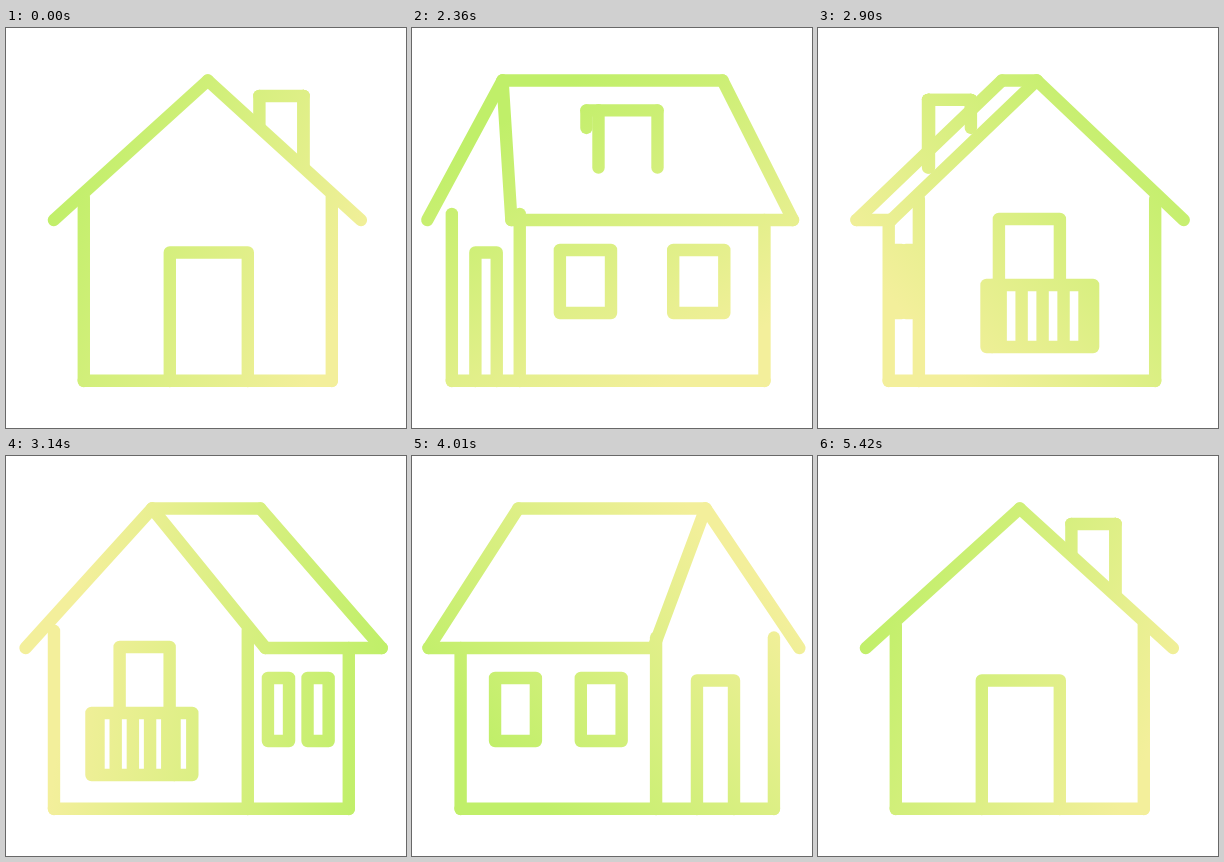
Recreate the animation shown at these times as an HTML page without scripts. Size 400 px wide and 400 px high, loop 5450 ms.

```html
<!DOCTYPE html>
<html lang="en">
<head>
<meta charset="utf-8">
<title>Turning house</title>
<style>
@property --a { syntax: "<number>"; inherits: true; initial-value: 0; }
@property --g { syntax: "<number>"; inherits: true; initial-value: 25; }

html, body { margin: 0; width: 100%; height: 100%; overflow: hidden; background: #fff; }
body { animation: turn 5450ms infinite; }

/* --a: turn of the house, --g: direction of the tint, in degrees */
@keyframes turn {
  0% { --a: 0; --g: 25; animation-timing-function: steps(1); }
  37.24% { --a: 1.5; --g: 25; animation-timing-function: steps(21); }
  48.8% { --a: 120; --g: 90; animation-timing-function: steps(8); }
  53.2% { --a: 166; --g: 138; animation-timing-function: steps(8); }
  57.61% { --a: 211; --g: 188; animation-timing-function: steps(7); }
  61.46% { --a: 241.5; --g: 222; animation-timing-function: steps(6); }
  64.77% { --a: 264; --g: 250; animation-timing-function: steps(11); }
  70.82% { --a: 298; --g: 300; animation-timing-function: steps(11); }
  76.88% { --a: 322; --g: 340; animation-timing-function: steps(12); }
  83.48% { --a: 340; --g: 370; animation-timing-function: steps(14); }
  91.19% { --a: 353; --g: 380; animation-timing-function: steps(15); }
  99.44%, 100% { --a: 360; --g: 385; }
}

svg {
  display: block; width: 400px; height: 400px; isolation: isolate;
  --p: cos(var(--a) * 1deg);
  --q: sin(var(--a) * 1deg);
  /* flattened cosine and sine: share of the gable and of the long side */
  --C: calc(var(--p) * pow(max(var(--p), -1 * var(--p)), .6));
  --S: calc(var(--q) * pow(max(var(--q), -1 * var(--q)), .6));
  --m: max(var(--C), -1 * var(--C));
  --n: max(var(--S), -1 * var(--S));
  --k: sin(var(--a) * 2deg);
  --c: calc(201.8 - 2 * var(--k) * var(--k));  /* centre of the ridge */
  --E: calc(var(--c) - .4 - 2.5 * var(--k));   /* centre of the eaves */
  --W: calc(var(--c) - 5.5 * var(--k));        /* centre of the walls */
  --T: calc(168 * var(--S));                   /* half eave */
  --R: calc(var(--S) * (174 - 51 * var(--n))); /* half ridge */
  --V: calc(var(--S) * var(--n));              /* chimney depth */
  --P: clamp(-18, 54 * var(--S), 18);          /* balcony depth */
  --B: calc(var(--W) + 146 * var(--S));        /* centre of the back wall */
  --top: calc(68 + 16 * max(var(--q), -1 * var(--q)));
}
.house { fill: none; stroke: #000; stroke-width: 12.4; stroke-linecap: round; stroke-linejoin: round; }
path { vector-effect: non-scaling-stroke; }

/* --s: right 1, left -1; --z: front 1, back -1 */
.r { --s: 1; } .l { --s: -1; }
.f { --z: 1; } .b { --z: -1; }

.edge, .post { opacity: calc(999 * (max(var(--z) * var(--C), var(--s) * var(--S)) - .004)); }
.edge {
  --x: calc(var(--c) - var(--z) * var(--R));
  --y: calc(var(--E) + var(--s) * 153.5 * var(--C) - var(--z) * var(--T));
  transform: matrix(1, 0, calc((var(--y) - var(--x)) / 139.5), 1, var(--x), 52.5);
}
.post {
  transform: matrix(1, 0, 0, calc(1 + max(0, var(--z) * var(--C)) * 22 / 161),
    calc(var(--W) + var(--s) * 124 * var(--C) - var(--z) * 146 * var(--S)), 353);
}
.ridge { transform: matrix(calc(var(--R) + .01), 0, 0, 1, var(--c), 52.5); opacity: calc(999 * (var(--n) - .004)); }
.floor { transform: matrix(calc(124 * var(--m) + 146 * var(--n)), 0, 0, 1, var(--W), 352.8); }
.eave {
  transform: matrix(calc(var(--T) + .01), 0, 0, 1, calc(var(--E) + var(--s) * 153.5 * var(--C)), 192);
}
.side { transform: matrix(var(--S), 0, 0, 1, calc(var(--W) + var(--s) * 124 * var(--C)), 0); }
.eave, .side { opacity: calc(999 * (var(--s) * var(--S) - .004)); }
.pane { transform: matrix(1, 0, 0, 1, calc(var(--s) * (50 + 21 * var(--n))), 0); }
.gable {
  transform: matrix(var(--C), 0, 0, 1, calc(var(--W) - var(--z) * 146 * var(--S)), 0);
  opacity: calc(999 * (var(--z) * var(--C) - .004));
}

.rail { transform: matrix(var(--C), 0, 0, 1, calc(var(--B) + var(--P)), 0); opacity: calc(999 * (.1 - var(--C))); }
.flank {
  transform: matrix(var(--P), 0, 0, 1, calc(var(--B) + var(--s) * 53 * var(--C)), 0);
  opacity: calc(999 * min(.1 - var(--C), var(--s) * var(--S) - .004));
}

.leg {
  --y: calc(53 + .9026 * var(--x));
  transform: matrix(1, 0, 0, calc(var(--y) - var(--top)),
    calc(var(--E) + var(--x) * var(--C) - var(--V) * (12 + 42 * var(--z))), var(--top));
}
.out { --x: 96; } .in { --x: 52; }
.lid { transform: matrix(calc(42 * var(--V) + .01), 0, 0, 1, calc(var(--E) + 96 * var(--C) - 12 * var(--V)), var(--top)); }
.rim { transform: matrix(var(--C), 0, 0, 1, calc(var(--E) - var(--V) * (12 + 42 * var(--z))), var(--top)); }
.in, .rim { opacity: calc(999 * (var(--z) * var(--C) - .004)); }
.far { opacity: calc(999 * max(var(--C), var(--S) + .15)); }
.near { opacity: calc(999 * (var(--S) - .004)); }

/* white roof that hides the chimney behind it */
.cover {
  fill: #fff; stroke: none;
  --x: max(var(--R), -1 * var(--R));
  --y: calc(153.5 * var(--m) + 168 * var(--n));
  clip-path: polygon(
    calc(1px * (var(--c) - var(--x))) 53px, calc(1px * (var(--c) + var(--x))) 53px,
    calc(1px * (var(--E) + var(--y))) 192px, calc(1px * (var(--E) - var(--y))) 192px);
}
.tint {
  fill: url(#lime); mix-blend-mode: screen;
  transform: translate(calc(1px * (212 - 10 * var(--C))), 204px) rotate(calc(var(--g) * 1deg));
}
</style>
</head>
<body>
<svg viewBox="0 0 400 400">
  <defs>
    <linearGradient id="lime" gradientUnits="userSpaceOnUse" x1="-155" y1="0" x2="155" y2="0">
      <stop offset="0" stop-color="#c0ef69"/>
      <stop offset="1" stop-color="#f3ef9b"/>
    </linearGradient>
    <g id="chimney">
      <path class="leg out f" d="M0 0V1"/>
      <path class="leg out b" d="M0 0V1"/>
      <path class="leg in f" d="M0 0V1"/>
      <path class="leg in b" d="M0 0V1"/>
      <path class="lid" d="M-1 0H1"/>
      <path class="rim f" d="M52 0H96"/>
      <path class="rim b" d="M52 0H96"/>
    </g>
    <g id="panes">
      <path class="pane r" d="M-30.5 222H30.5V285H-30.5Z"/>
      <path class="pane l" d="M-30.5 222H30.5V285H-30.5Z"/>
    </g>
  </defs>
  <rect width="400" height="400" fill="#fff"/>
  <g class="house">
    <use class="far" href="#chimney"/>
    <rect class="cover" width="400" height="400"/>
    <use class="near" href="#chimney"/>

    <g class="side r"><use href="#panes"/></g>
    <g class="side l"><use href="#panes"/></g>
    <g class="gable f"><path d="M-38 353V224.5H40V353"/></g>
    <g class="gable b"><path d="M-24 257V191H40V257"/></g>

    <path class="flank r" d="M0 257H1V319H0Z"/>
    <path class="flank l" d="M0 257H1V319H0Z"/>
    <path class="rail" d="M-53 257H53V319H-53ZM-44 257V319M-22 257V319M0 257V319M22 257V319M44 257V319"/>

    <path class="post r f" d="M0 0V-161"/>
    <path class="post r b" d="M0 0V-161"/>
    <path class="post l f" d="M0 0V-161"/>
    <path class="post l b" d="M0 0V-161"/>
    <path class="floor" d="M-1 0H1"/>

    <path class="edge r f" d="M0 0V139.5"/>
    <path class="edge r b" d="M0 0V139.5"/>
    <path class="edge l f" d="M0 0V139.5"/>
    <path class="edge l b" d="M0 0V139.5"/>
    <path class="ridge" d="M-1 0H1"/>
    <path class="eave r" d="M-1 0H1"/>
    <path class="eave l" d="M-1 0H1"/>
  </g>
  <rect class="tint" x="-400" y="-400" width="800" height="800"/>
</svg>
</body>
</html>
```
